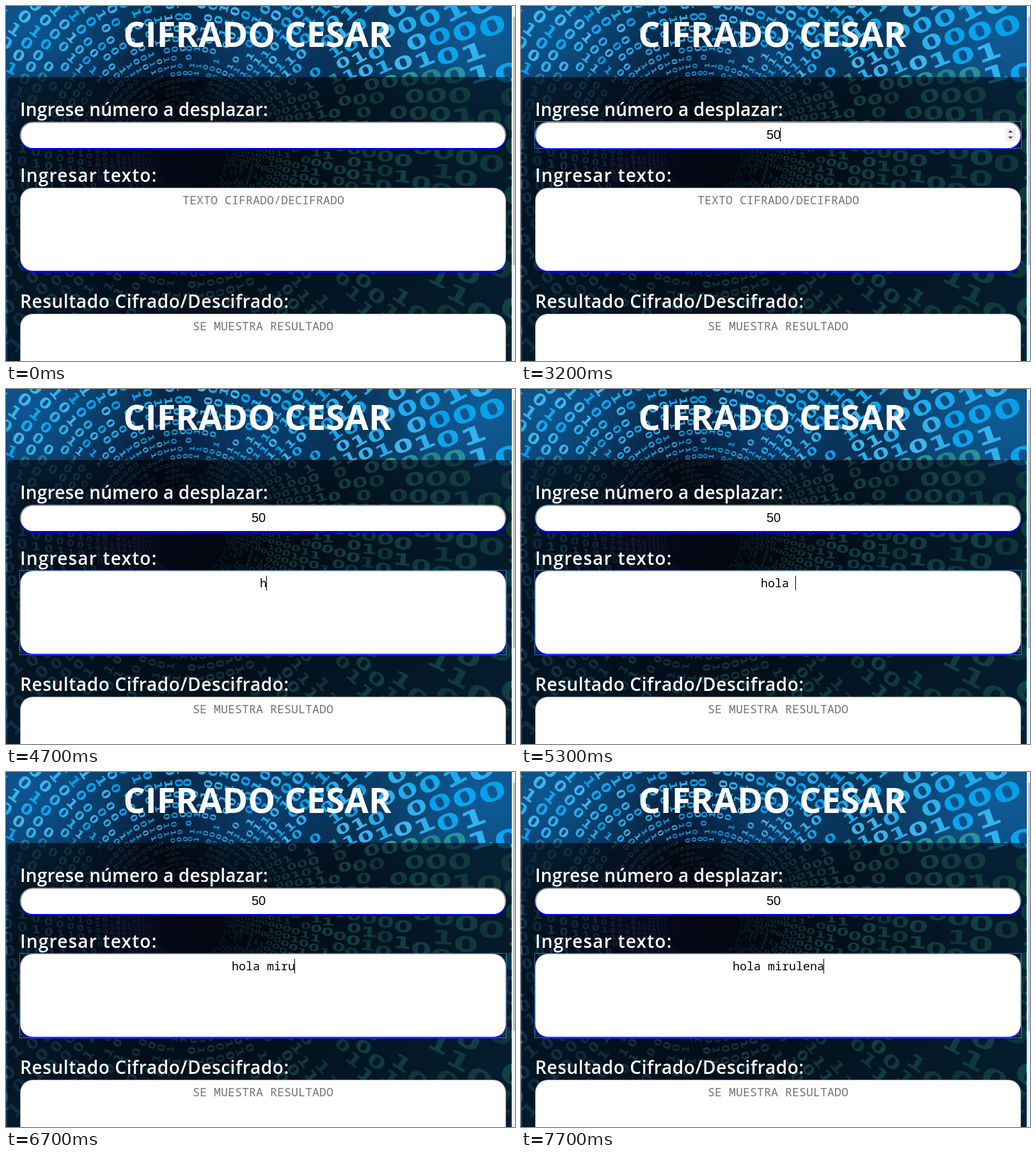
Recreate the animation shown at these times as an HTML page with a canvas. Size 796 by 555 pixels, loop 8000 ms.

```html
<!DOCTYPE html>
<html lang="es">
<head>
<meta charset="utf-8">
<title>Cifrado Cesar</title>
<style>
  html, body { margin: 0; width: 100%; height: 100%; overflow: hidden; background: #04101f; }
  canvas { display: block; }
</style>
</head>
<body>
<canvas id="stage" width="796" height="555"></canvas>
<script>
const W = 796, H = 555, LOOP = 8000, PANEL_TOP = 111;
const MONO = '18.33px "Noto Sans Mono", monospace';
const LABEL = '600 28px "Open Sans", sans-serif';
const NUMBER = '20px "Liberation Sans", Arial, sans-serif';

const MESSAGE = 'hola mirulena';
const NUMBER_FOCUS = 1000, TEXT_FOCUS = 3400, HOVER = 600;
const numberKeys = [2000, 2200];
const textKeys = [4700, 4800, 5000, 5100, 5300, 6100, 6300, 6500, 6700, 7000, 7100, 7600, 7700];

const ctx = document.getElementById('stage').getContext('2d');

function makeRandom(seed) {
  return () => {
    seed = (seed * 1664525 + 1013904223) % 4294967296;
    return seed / 4294967296;
  };
}

function glow(c, x, y, r, stops) {
  const g = c.createRadialGradient(x, y, 0, x, y, r);
  stops.forEach(([at, color]) => g.addColorStop(at, color));
  c.fillStyle = g;
  c.fillRect(0, 0, W, H);
}

function roundBox(c, x, y, w, h, r, color) {
  c.fillStyle = color;
  c.beginPath();
  c.roundRect(x, y, w, h, r);
  c.fill();
}

function text(c, str, x, y, font, color, align = 'left', spacing = 0) {
  c.font = font;
  c.fillStyle = color;
  c.textAlign = align;
  c.letterSpacing = spacing + 'px';
  c.fillText(str, x, y);
}

// Rings of binary digits receding into a dark tunnel.
function drawTunnel(c) {
  const cx = 285, cy = 235, perRing = 84, rand = makeRandom(41);
  glow(c, cx, cy, 620, [[0, '#06102a'], [0.2, '#04142a'], [0.45, '#073052'], [0.75, '#0a4068'], [1, '#0b5080']]);
  glow(c, 180, 230, 120, [[0, 'rgba(50,30,120,.5)'], [1, 'rgba(50,30,120,0)']]);
  glow(c, 40, 30, 220, [[0, 'rgba(20,120,200,.5)'], [1, 'rgba(20,120,200,0)']]);
  glow(c, 390, 75, 150, [[0, 'rgba(20,110,190,.4)'], [1, 'rgba(20,110,190,0)']]);
  glow(c, 740, 40, 200, [[0, 'rgba(20,120,200,.45)'], [1, 'rgba(20,120,200,0)']]);

  c.textAlign = 'center';
  c.textBaseline = 'middle';
  for (let ring = 0; ring < 28; ring++) {
    const r = 60 * Math.pow(1.09, ring);
    c.font = `bold ${r * 0.076}px "DejaVu Sans", sans-serif`;
    for (let i = 0; i < perRing; i++) {
      const a = i / perRing * Math.PI * 2 + ring * 0.02;
      const x = cx + r * Math.cos(a), y = cy + r * Math.sin(a);
      const skip = rand() < 0.16, digit = rand() < 0.65 ? '0' : '1', shade = rand();
      if (skip || x < -40 || x > W + 40 || y < -40 || y > H + 40) continue;
      const open = y < PANEL_TOP;
      const hue = open ? 199 : 202 - 22 * Math.min(1, Math.max(0, x / 500));
      const light = open ? 48 + shade * 16 : 34 + shade * 9;
      c.save();
      c.translate(x, y);
      c.rotate(Math.cos(a) < 0 ? a + Math.PI : a);
      c.scale(1.15 + 0.55 * Math.max(0, Math.cos(a)) ** 2, 1);
      c.fillStyle = `hsla(${hue},${open ? 95 : 58}%,${light}%,${Math.min(0.9, 0.3 + r / 330)})`;
      c.fillText(digit, 0, 0);
      c.restore();
    }
  }
  c.textBaseline = 'alphabetic';
}

function drawField(c, y, h, border) {
  roundBox(c, 22, y, 760, h + 3, 20, '#0000f0');
  roundBox(c, 22, y, 760, h, 20, '#a3a3a3');
  roundBox(c, 22 + border, y + border, 760 - 2 * border, h - border, 20 - border, '#fff');
}

function drawPage(c) {
  drawTunnel(c);
  roundBox(c, 2, PANEL_TOP, 788, 470, 8, 'rgba(0,0,0,.6)');
  c.fillStyle = '#f1f1f1';
  c.fillRect(791, 0, 5, H);
  c.fillStyle = '#c1c1c1';
  c.fillRect(793, 17, 3, 388);

  text(c, 'CIFRADO CESAR', 393, 64, 'bold 54px "Open Sans", sans-serif', '#fff', 'center');
  text(c, 'Ingrese número a desplazar:', 22, 172, LABEL, '#fff', 'left', 0.2);
  text(c, 'Ingresar texto:', 22, 275, LABEL, '#fff', 'left', 1.2);
  text(c, 'Resultado Cifrado/Descifrado:', 22, 472, LABEL, '#fff', 'left', 0.6);

  drawField(c, 181, 41, 2);
  drawField(c, 284, 130, 1);
  drawField(c, 481, 130, 1);
  text(c, 'SE MUESTRA RESULTADO', 402, 507, MONO, '#757575', 'center');

  c.strokeStyle = '#777';
  c.lineWidth = 1;
  c.beginPath();
  c.moveTo(773, 412); c.lineTo(780, 405);
  c.moveTo(777, 412); c.lineTo(780, 409);
  c.stroke();
}

function drawOutline(y, h) {
  ctx.strokeStyle = 'rgba(77,144,254,.7)';
  ctx.lineWidth = 1;
  ctx.strokeRect(21.5, y + 0.5, 761, h - 1);
}

function drawArrow(y, dir) {
  ctx.beginPath();
  ctx.moveTo(762, y);
  ctx.lineTo(769, y);
  ctx.lineTo(765.5, y + 4 * dir);
  ctx.fill();
}

function drawSpinner(focused) {
  if (focused) {
    ctx.fillStyle = '#f0f0f0';
    ctx.fillRect(758, 191, 15, 21);
  }
  ctx.fillStyle = '#505050';
  drawArrow(198, -1);
  drawArrow(204, 1);
}

const typed = (keys, t) => keys.filter(k => k <= t).length;

function drawCaret(x, y, h, since, t) {
  if ((t - since) % 1000 >= 500) return;
  ctx.fillStyle = '#000';
  ctx.fillRect(Math.round(x), y, 1, h);
}

function draw(t) {
  ctx.drawImage(page, 0, 0);

  const digits = typed(numberKeys, t);
  const inNumber = t >= NUMBER_FOCUS && t < TEXT_FOCUS;
  if (t >= HOVER && t < TEXT_FOCUS) drawSpinner(inNumber);
  text(ctx, '50'.slice(0, digits), 395, 208, NUMBER, '#000', 'center');
  if (inNumber) {
    drawOutline(180, 43);
    drawCaret(394.5 + 5.3 * digits, 190, 22, digits ? numberKeys[digits - 1] : NUMBER_FOCUS, t);
  }

  const n = typed(textKeys, t);
  if (n) text(ctx, MESSAGE.slice(0, n), 402.5 - 5.5 * n, 310, MONO, '#000');
  else text(ctx, 'TEXTO CIFRADO/DECIFRADO', 402.5, 310, MONO, '#757575', 'center');
  if (t >= TEXT_FOCUS) {
    drawOutline(283, 133);
    drawCaret(401.5 + 5.5 * n, 292, 23, n ? textKeys[n - 1] : TEXT_FOCUS - 100, t);
  }
}

const page = document.createElement('canvas');
page.width = W;
page.height = H;
drawPage(page.getContext('2d'));

// Time counts from page load, so every pose depends on the clock alone.
function tick() {
  draw(performance.now() % LOOP);
  requestAnimationFrame(tick);
}
tick();
</script>
</body>
</html>
```
